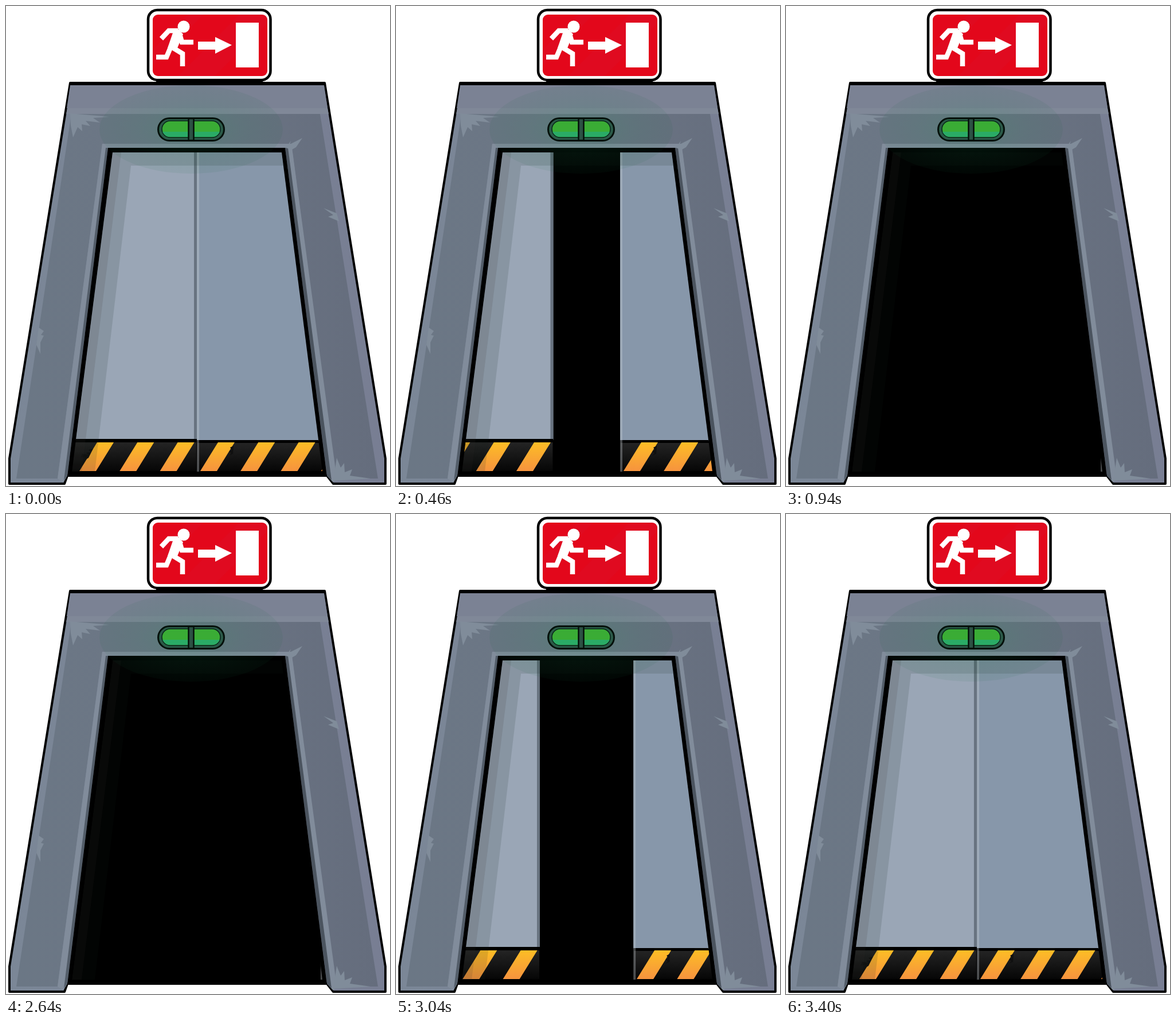
Write an HTML page that moves like this. It is 670 px wide and 836 px high and loops after 3600 ms.

```html
<!DOCTYPE html>
<html lang="en">
<head>
<meta charset="utf-8">
<title>Sliding door</title>
<style>
  html, body { margin: 0; width: 100%; height: 100%; overflow: hidden; background: #fff; }
  svg { display: block; }
</style>
</head>
<body>
<svg width="670" height="836" viewBox="0 0 670 836">
  <defs>
    <clipPath id="opening"><path d="M186 255H481L545 755L552 811H115L122 755Z"/></clipPath>
    <linearGradient id="orange" x2="0" y2="1"><stop stop-color="#fdbd25"/><stop offset="1" stop-color="#f6933e"/></linearGradient>
    <linearGradient id="rubber" x2="0" y2="1"><stop stop-color="#242424"/><stop offset="1" stop-color="#060606"/></linearGradient>
    <linearGradient id="face"><stop stop-color="#6b7785"/><stop offset=".4" stop-color="#6c7685"/><stop offset="1" stop-color="#656d7d"/></linearGradient>
    <linearGradient id="bevel"><stop stop-color="#7b8797"/><stop offset="1" stop-color="#787e93"/></linearGradient>
    <radialGradient id="glow"><stop stop-color="#14a050" stop-opacity=".22"/><stop offset=".55" stop-color="#127a48" stop-opacity=".12"/><stop offset="1" stop-color="#0c6038" stop-opacity=".07"/></radialGradient>
  </defs>

  <!-- frame -->
  <path d="M112 134H556L662 788V832H571L560 818H107L102 832H6V788Z" fill="url(#bevel)" stroke="#000" stroke-width="4" stroke-linejoin="round"/>
  <path d="M111 135H557" stroke="#000" stroke-width="6"/>
  <path d="M112 138H555L561 178H106Z" fill="#7b8294"/>
  <path d="M107 178H561L563 188H105Z" fill="#808898"/>
  <path d="M114 188H548L649 823H575L498 240H168L90 823H18Z" fill="url(#face)"/>
  <path d="M168 240H498L577 822L571 830L560 818L487 247H178L107 818L100 830L90 823Z" fill="#818c9b"/>
  <path d="M174 247H178L107 818L101 826Z" fill="#535d69"/>
  <path d="M487 247H492L568 826L560 818Z" fill="#4b545f"/>
  <!-- scratches -->
  <g fill="#808c9a">
    <path d="M112 187L180 193L152 195L164 203L139 200L147 209L132 206L133 218L125 211L117 229L113 208Z"/>
    <path d="M488 247L497 235L495 241L517 230L506 246L499 250Z"/>
    <path d="M554 352L577 361L581 375L562 367L571 364Z"/>
    <path d="M57 560L66 566L61 573L66 574L60 586V606L53 590Z"/>
    <path d="M571 827L577 787L584 804L590 796L591 812L604 807L600 818L636 823Z"/>
  </g>

  <!-- doors -->
  <path d="M178 247H487L560 819H107Z"/>
  <g clip-path="url(#opening)">
    <g id="left">
      <path d="M60 250H333V756H60Z" fill="#9aa6b6"/>
      <path d="M328 250H333V756H328Z" fill="#687380"/>
      <path d="M60 754H333V818H60Z"/>
      <path d="M60 760H332V810H60Z" fill="url(#rubber)"/>
      <g class="stripes"></g>
      <path d="M152 771L144 773L148 777L140 778L144 782L133 780L130 787L138 785L137 791L144 787Z" fill="#101010"/>
    </g>
    <g id="right">
      <path d="M333 250H620V758H333Z" fill="#8797aa"/>
      <path d="M333 756H620V818H333Z"/>
      <path d="M334 761H620V810H334Z" fill="url(#rubber)"/>
      <g class="stripes"></g>
      <path d="M397 766L391 769L394 773L389 776L393 779L389 783L396 780Z" fill="#101010"/>
      <path d="M333 250H337V811H333Z" fill="#c8cdd4" fill-opacity=".35"/>
    </g>
    <path d="M186 255H481L484 278H218L155 811H115Z" fill="#14201c" fill-opacity=".13"/>
    <path d="M186 255H201L132 811H115Z" fill="#302828" fill-opacity=".12"/>
  </g>
  <ellipse cx="323" cy="215" rx="160" ry="77" fill="url(#glow)"/>

  <!-- lamp -->
  <rect x="265.5" y="195.500" width="115" height="39" rx="19.500" fill="#2b5a48" stroke="#04100a" stroke-width="3"/>
  <rect x="272" y="200" width="102" height="29" rx="14.500" fill="#3aac35" stroke="#08251a" stroke-width="1.500"/>
  <path d="M273 219H373Q369 228 359 228H287Q277 228 273 219Z" fill="#2aab66"/>
  <path d="M318.500 196H327.500V234H318.500Z" fill="#2c5144" stroke="#04100a" stroke-width="2.500"/>

  <!-- sign -->
  <path d="M262 130H448V133H262Z"/>
  <rect x="248" y="7" width="213.500" height="122" rx="16" fill="#fff" stroke="#000" stroke-width="4.500"/>
  <rect x="256" y="15" width="200" height="107" rx="9" fill="#e3071b"/>
  <path d="M256 76L317 15H344L256 103ZM300 122L407 15H447Q456 15 456 24V30L364 122Z" fill="#cf1535" fill-opacity=".2"/>
  <g fill="#fff">
    <circle cx="310" cy="36" r="10.500"/>
    <path d="M284 39L301 41L309 49L297 78L282 73L291 47Z"/>
    <path d="M335 62H365V54L394 68L365 83V76H335Z"/>
    <path d="M401 29H441V107H401Z"/>
  </g>
  <path d="M271 57L284 43H300M303 49L307 63H327M288 70L280 89H262M290 72L308 83V105" fill="none" stroke="#fff" stroke-width="8.500"/>
</svg>
<script>
  const loop = 3600, travel = 219;
  const left = document.getElementById('left'), right = document.getElementById('right');

  const stripes = (from, to) => {
    let d = '';
    for (let k = from; k <= to; k++) d += `M${159 + 70.3 * k} 760h29l-31 50h-29z`;
    return `<path d="${d}" fill="url(#orange)"/>`;
  };
  left.querySelector('.stripes').innerHTML = stripes(0, 2);
  right.querySelector('.stripes').innerHTML = stripes(3, 6);

  const progress = (t, start, length) => Math.min(1, Math.max(0, (t - start) / length));
  const ease = u => (1 - Math.cos(Math.PI * u)) / 2;

  function gap(t) {
    return t < 1800
      ? travel * ease(progress(t, 190, 780))
      : travel * (1 - ease(progress(t, 2620, 790) ** 0.86));
  }

  function draw() {
    const t = Math.floor(performance.now() % loop / 20) * 20;
    const x = gap(t);
    left.setAttribute('transform', `translate(${-x})`);
    right.setAttribute('transform', `translate(${x * 0.99})`);
    requestAnimationFrame(draw);
  }
  draw();
</script>
</body>
</html>
```
